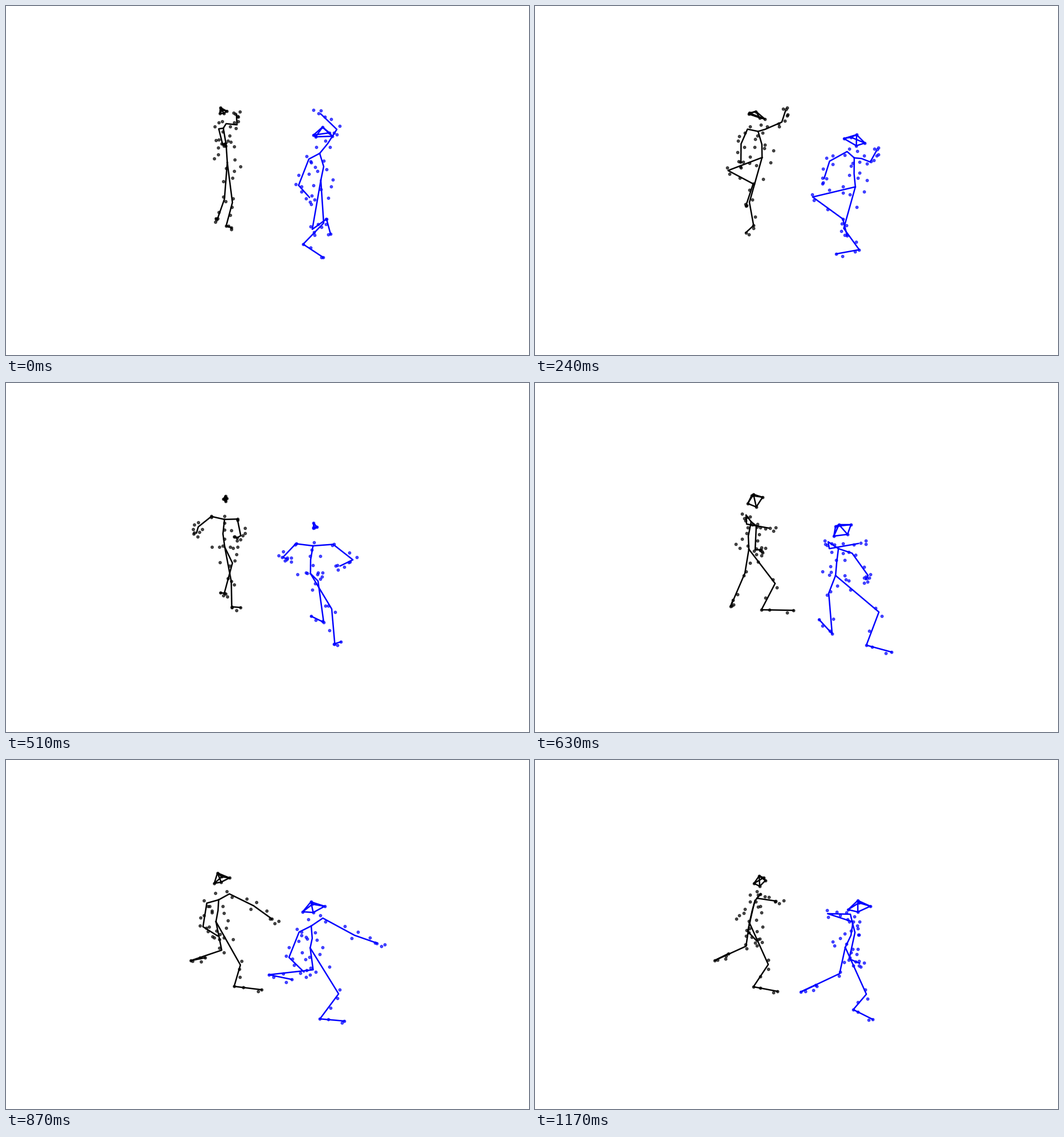
Recreate the animation shown at these times as a matplotlib script. Size 917 by 611 pixels, loop 1200 ms.

```python
import numpy as np
import matplotlib.pyplot as plt
from matplotlib.animation import FuncAnimation

W, H, DPI = 917, 611, 100
FRAMES, STEP = 40, 30
PX = 72 / DPI

# Joint order: crown, four head corners, neck, mid back, pelvis,
# left arm, right arm (shoulder, elbow, wrist), right leg, left leg (knee, heel, toe)
NECK, MID, PELVIS = 5, 6, 7
L_ARM, R_ARM, R_LEG, L_LEG = 8, 11, 14, 17
CHAINS = [
    [1, 2, 3, 4, 1], [1, 0, 2], [3, 0, 4],
    [NECK, MID, PELVIS],
    [NECK, 8, 9, 10], [NECK, 11, 12, 13],
    [PELVIS, 14, 15, 16], [PELVIS, 17, 18, 19],
]


def key(frame, yaw, head, trunk, arms, legs):
    """One key pose: frame, body heading in degrees, joints in pixels."""
    return frame, yaw, np.array(head + trunk + arms + legs, float).reshape(-1, 2)


black = [
    key(0, -70, [376, 178, 387, 184, 382, 188, 375, 188, 379, 182],
        [381, 214, 386, 243, 388, 274],
        [386, 206, 405, 208, 404, 190, 373, 215, 380, 243, 387, 240],
        [383, 338, 371, 372, 368, 372, 397, 344, 386, 385, 395, 388]),
    key(5, 0, [389, 176, 406, 189, 377, 188, 370, 186, 405, 188],
        [392, 213, 400, 237, 399, 261],
        [408, 205, 440, 179, 437, 142, 366, 214, 355, 248, 364, 282],
        [330, 297, 369, 318, 354, 360, 391, 344, 381, 385, 386, 400]),
    key(12, 85, [381, 198, 372, 204, 374, 193, 385, 192, 391, 210],
        [386, 231, 389, 254, 392, 277],
        [388, 233, 408, 249, 431, 261, 385, 221, 379, 235, 366, 252],
        [367, 290, 399, 323, 394, 341, 360, 344, 389, 384, 356, 389]),
    key(21, 250, [383, 195, 399, 200, 388, 217, 373, 211, 380, 197],
        [379, 243, 374, 268, 375, 291],
        [370, 231, 371, 247, 410, 254, 388, 250, 386, 292, 398, 292],
        [368, 333, 343, 391, 347, 380, 421, 351, 397, 397, 453, 398]),
    key(25, 290, [369, 196, 389, 205, 373, 218, 363, 213, 378, 198],
        [371, 246, 369, 266, 365, 287],
        [379, 233, 414, 254, 458, 272, 362, 252, 363, 293, 388, 301],
        [373, 331, 331, 370, 355, 357, 414, 355, 390, 396, 451, 400]),
    key(33, 325, [380, 200, 399, 207, 388, 211, 373, 218, 383, 210],
        [379, 243, 377, 262, 375, 281],
        [401, 235, 432, 252, 452, 273, 356, 249, 341, 292, 362, 313],
        [380, 334, 319, 341, 340, 342, 410, 361, 408, 397, 442, 404]),
    key(39, 285, [393, 203, 404, 211, 394, 221, 384, 216, 401, 206],
        [386, 246, 381, 263, 376, 285],
        [396, 234, 389, 242, 423, 247, 384, 252, 373, 300, 389, 317],
        [370, 326, 315, 351, 339, 339, 409, 358, 383, 397, 425, 405]),
]

blue = [
    key(0, -40, [555, 212, 572, 228, 543, 229, 539, 226, 567, 222],
        [550, 258, 557, 281, 552, 305],
        [564, 241, 580, 216, 552, 189, 531, 268, 513, 314, 532, 335],
        [537, 391, 562, 373, 569, 399, 557, 380, 521, 417, 556, 440]),
    key(5, 0, [568, 218, 577, 236, 549, 232, 548, 231, 582, 231],
        [562, 261, 565, 289, 566, 312],
        [580, 257, 593, 240, 590, 197, 541, 256, 500, 279, 502, 311],
        [474, 353, 538, 376, 540, 408, 556, 388, 566, 414, 539, 442]),
    key(12, 90, [552, 236, 542, 255, 530, 234, 558, 230, 565, 251],
        [551, 274, 547, 300, 549, 323],
        [553, 278, 571, 315, 598, 334, 554, 260, 549, 276, 528, 299],
        [524, 321, 547, 373, 561, 392, 526, 390, 561, 448, 526, 425]),
    key(21, 235, [533, 248, 554, 248, 548, 265, 524, 268, 527, 251],
        [532, 290, 529, 314, 527, 337],
        [514, 278, 516, 290, 567, 281, 556, 298, 584, 337, 580, 344],
        [515, 368, 521, 439, 498, 414, 603, 401, 581, 459, 625, 471]),
    key(25, 290, [534, 244, 558, 249, 541, 262, 522, 262, 536, 247],
        [535, 287, 533, 313, 531, 330],
        [542, 270, 582, 294, 623, 306, 530, 299, 523, 347, 545, 364],
        [530, 366, 461, 405, 492, 393, 593, 406, 562, 462, 608, 460]),
    key(33, 325, [540, 253, 563, 262, 543, 272, 524, 270, 541, 258],
        [538, 294, 542, 311, 536, 330],
        [559, 284, 602, 311, 643, 320, 515, 303, 499, 342, 520, 369],
        [541, 370, 479, 365, 509, 384, 577, 411, 547, 442, 585, 457]),
    key(39, 260, [566, 246, 588, 256, 566, 266, 549, 262, 568, 250],
        [557, 287, 554, 307, 544, 328],
        [553, 270, 513, 269, 556, 283, 561, 302, 551, 348, 569, 356],
        [534, 374, 466, 406, 492, 394, 581, 410, 558, 437, 592, 454]),
]

# Sideways reach of each joint while the back faces the viewer
REACH = np.zeros(20)
REACH[L_ARM:L_ARM + 3] = -14, -38, -75
REACH[R_ARM:R_ARM + 3] = 12, 22, 18
REACH[R_LEG:R_LEG + 3] = 28, 12, 8
TURN_START, TURN_LEN = 12, 9


def body_markers():
    """Rows: joint a, joint b, place along a-b, radius, angle (0 = left), drop."""
    rows = [
        (NECK, PELVIS, 0, 9, 270, -9), (NECK, PELVIS, .15, 11, 90, 3),
        (NECK, PELVIS, .3, 17, 225, 0), (NECK, PELVIS, .5, 17, 90, 0),
        (NECK, PELVIS, .6, 14, 270, 0),
    ]
    rows += [(NECK, PELVIS, 1, 23, a, d) for a, d in
             ((15, 2), (80, 6), (130, 8), (165, 2), (245, -8), (295, -8))]
    for arm, out in ((L_ARM, 0), (R_ARM, 180)):
        sh, el, wr = arm, arm + 1, arm + 2
        rows += [
            (NECK, sh, 1, 7, 90, 4), (NECK, sh, 1, 7, 270, -3),
            (sh, el, .55, 10, out, 0),
            (sh, el, 1, 7, out, -4), (sh, el, 1, 7, out + 180, 4),
            (el, wr, .55, 7, out, -2),
            (el, wr, .9, 5, out, 3), (el, wr, 1.02, 5, out + 180, -2),
            (el, wr, 1.2, 6, 60, -1), (el, wr, 1.3, 5, 240, 2),
        ]
    for leg, out in ((R_LEG, 180), (L_LEG, 0)):
        kn, he, to = leg, leg + 1, leg + 2
        rows += [
            (PELVIS, kn, .45, 14, out, 0),
            (PELVIS, kn, .96, 5, out, -3), (PELVIS, kn, 1.03, 5, out + 180, 4),
            (kn, he, .6, 7, out, 0),
            (he, to, 0, 0, 0, 0), (he, to, .27, 4, out, 1),
            (he, to, .82, 4, out, 5), (he, to, 1, 0, 0, 0),
        ]
    rows += [(j, j, 0, 0, 0, 0) for j in range(5)]
    return np.array(rows, float)


MARKERS = body_markers()
A, B = MARKERS[:, 0].astype(int), MARKERS[:, 1].astype(int)
ALONG, RADIUS, ANGLE, DROP = MARKERS[:, 2:].T


def hermite(times, values, t):
    """Smooth curve through the key values."""
    slopes = np.gradient(values, times, axis=0)
    i = min(np.searchsorted(times, t, side="right") - 1, len(times) - 2)
    span = times[i + 1] - times[i]
    u = (t - times[i]) / span
    ease = u * u * (3 - 2 * u)
    return (values[i] * (1 - ease) + values[i + 1] * ease
            + span * u * (1 - u) * ((1 - u) * slopes[i] - u * slopes[i + 1]))


class Dancer:
    def __init__(self, ax, keys, color):
        self.times = np.array([k[0] for k in keys], float)
        self.yaws = np.array([k[1] for k in keys], float)
        self.poses = np.array([k[2] for k in keys])
        self.bones = [ax.plot([], [], color=color, lw=2.5 * PX,
                              solid_joinstyle="round")[0] for _ in CHAINS]
        self.dots, = ax.plot([], [], "o", color=color, ms=4.6 * PX,
                             mew=1.2 * PX, alpha=.7)
        self.artists = self.bones + [self.dots]

    def draw(self, frame):
        joints = hermite(self.times, self.poses, frame)
        turn = np.clip((frame - TURN_START) / TURN_LEN, 0, 1)
        joints[:, 0] += REACH * np.sin(np.pi * turn)
        for line, chain in zip(self.bones, CHAINS):
            line.set_data(*joints[chain].T)

        around = np.radians(ANGLE + hermite(self.times, self.yaws, frame))
        spots = joints[A] + (joints[B] - joints[A]) * ALONG[:, None]
        self.dots.set_data(spots[:, 0] + RADIUS * np.cos(around),
                           spots[:, 1] + .35 * RADIUS * np.sin(around) + DROP)


fig = plt.figure(figsize=((W + 1e-4) / DPI, (H + 1e-4) / DPI), dpi=DPI,
                 facecolor="white")
ax = fig.add_axes([0, 0, 1, 1])
ax.set(xlim=(0, W), ylim=(H, 0))
ax.axis("off")
dancers = [Dancer(ax, black, "black"), Dancer(ax, blue, "blue")]


def update(frame):
    for dancer in dancers:
        dancer.draw(frame)
    return [a for d in dancers for a in d.artists]


anim = FuncAnimation(fig, update, frames=FRAMES, interval=STEP,
                     repeat=True, repeat_delay=0, blit=False)
plt.show()
```
